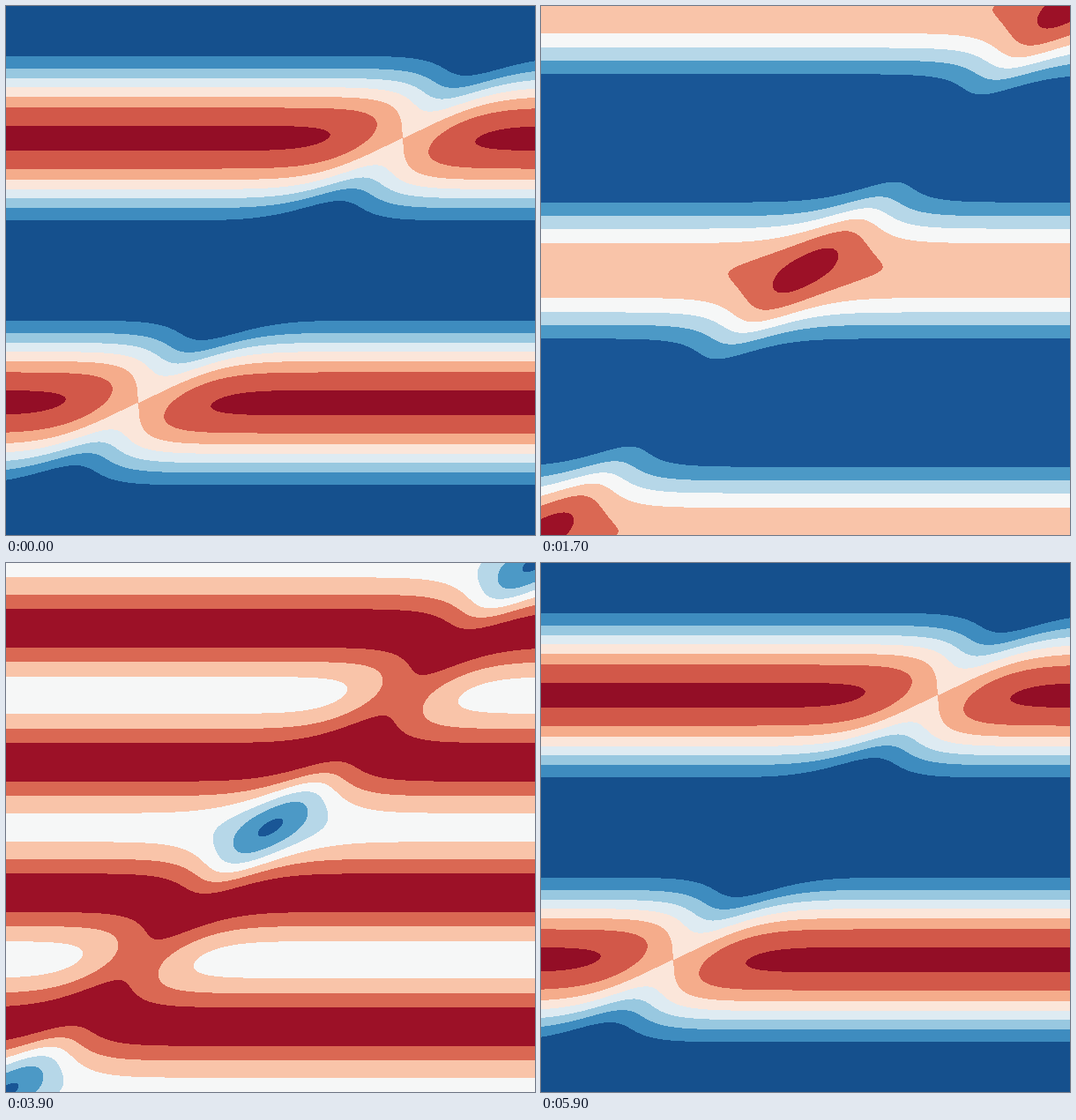
A matplotlib script that plays this animation: 600x600 px, repeating every 6000 ms.

```python
import numpy as np
import matplotlib.pyplot as plt
from matplotlib.animation import FuncAnimation

FRAMES = 60
INTERVAL = 100
GRID = 300

axis = np.linspace(-np.pi, np.pi, GRID)
x, y = np.meshgrid(axis, axis)
phase = np.cos(2 * y) + np.cos(np.tanh(2 * (x - y)))
times = np.linspace(0, 2 * np.pi, FRAMES)

fig = plt.figure(figsize=(6, 6), dpi=100)
ax = fig.add_axes([0, 0, 1, 1])


def draw(i):
    # Contour levels are chosen afresh for each frame's value range.
    ax.clear()
    ax.contourf(x, y, np.sin(times[i] + phase), cmap="RdBu")
    ax.set_xlim(-np.pi, np.pi)
    ax.set_ylim(-np.pi, np.pi)
    ax.axis("off")
    return ax.collections


anim = FuncAnimation(fig, draw, frames=FRAMES, interval=INTERVAL,
                     init_func=lambda: draw(0), repeat=True, repeat_delay=0)
plt.show()
```
